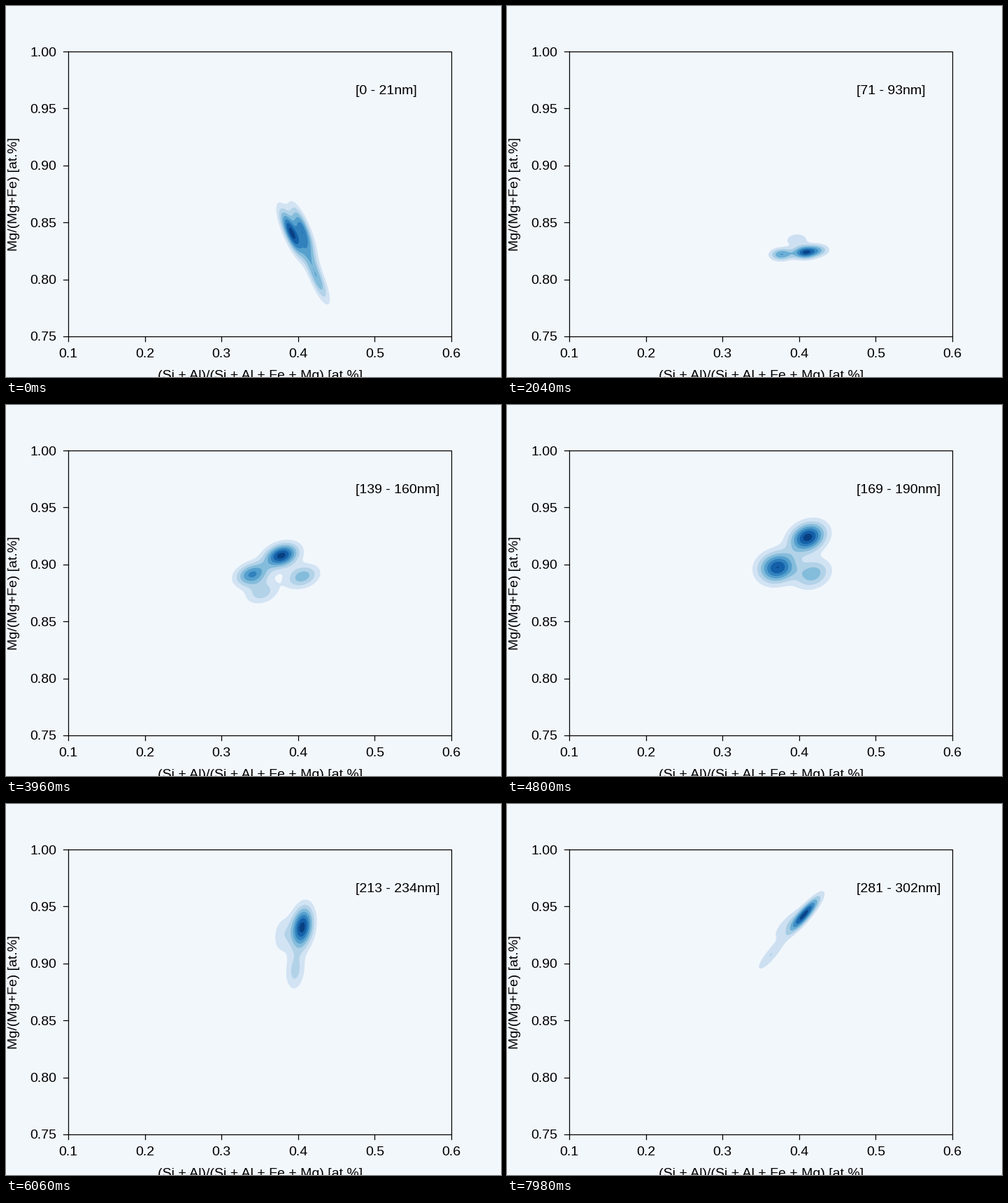
Write a matplotlib script that moves like this. It is 708 px wide and 530 px high and loops after 8000 ms.

```python
import numpy as np
import matplotlib.pyplot as plt
from matplotlib.animation import FuncAnimation

W, H, DPI = 708, 530, 100
INTERVAL, STEP_MS, LOOP = 20, 60, 8000
LEFT, RIGHT, TOP, BOTTOM = 89, 637, 65, 472
DEPTH, WINDOW = 2.1154, 10      # nm per step, steps per depth window
FADE = 0.7                      # weight of each peak relative to the one before
SOFT = 18                       # smallest kernel variance, px^2
WANDER = 9                      # px, free motion between key clouds
BG = "#f2f7fc"

plt.rcParams["font.family"] = "Liberation Sans"
plt.rcParams["font.size"] = 14

# Key clouds: step, colour bands, kernel spread, peaks from strong to weak
CLOUDS = [
    (0, 8, 0.40, [(408, 324), (424, 318), (446, 392), (431, 350)]),
    (20, 7, 0.27, [(430, 331), (398, 291), (468, 418), (463, 364)]),
    (49, 7, 0.17, [(405, 368), (379, 416), (437, 291), (363, 287)]),
    (66, 8, 0.23, [(394, 215), (352, 242), (424, 245), (366, 268)]),
    (92, 8, 0.40, [(450, 180), (408, 213), (460, 246), (398, 200)]),
    (112, 8, 0.42, [(387, 177), (453, 142), (355, 208), (370, 188)]),
    (133, 7, 0.31, [(421, 163), (431, 151), (377, 216), (397, 172)]),
]
key_steps, key_bands, key_spread, key_peaks = map(np.array, zip(*CLOUDS))
weights = FADE ** np.arange(4)
gx, gy = np.meshgrid(np.arange(240, 561, 2.0), np.arange(66, 473, 2.0))


def cloud(step):
    """Peaks, kernel spread and density height in contour steps."""
    i = min(np.searchsorted(key_steps, step, side="right"), len(CLOUDS) - 1) - 1
    u = (step - key_steps[i]) / (key_steps[i + 1] - key_steps[i])
    ease = u * u * (3 - 2 * u)

    def mix(keys):
        return keys[i] + (keys[i + 1] - keys[i]) * ease

    phase = 0.4 * step + 1.7 * np.arange(4)
    drift = np.column_stack([np.sin(phase), np.cos(1.3 * phase)])
    peaks = mix(key_peaks) + WANDER * np.sin(np.pi * u) * drift
    return peaks, mix(key_spread), mix(key_bands) - 0.5


def density(peaks, spread):
    p = np.linalg.inv(np.cov(peaks.T) * spread + SOFT * np.eye(2))
    z = np.zeros_like(gx)
    for (x, y), w in zip(peaks, weights):
        dx, dy = gx - x, gy - y
        z += w * np.exp(-0.5 * (p[0, 0] * dx * dx + 2 * p[0, 1] * dx * dy
                                + p[1, 1] * dy * dy))
    return z / z.max()


fig = plt.figure(figsize=(W / DPI, H / DPI), dpi=DPI, facecolor=BG)
ax = fig.add_axes([0, 0, 1, 1])
ax.set_xlim(0, W)
ax.set_ylim(H, 0)
ax.axis("off")


def line(xs, ys):
    ax.plot(xs, ys, color="black", lw=0.9, zorder=5)


def label(x, y, text, **kw):
    return ax.text(x, y, text, va="baseline", zorder=6, **kw)


line([LEFT, RIGHT, RIGHT, LEFT, LEFT], [TOP, TOP, BOTTOM, BOTTOM, TOP])
for k in range(6):
    x = LEFT + (RIGHT - LEFT) * k / 5
    y = BOTTOM + (TOP - BOTTOM) * k / 5
    line([x, x], [BOTTOM, BOTTOM + 7])
    line([LEFT - 7, LEFT], [y, y])
    label(x, 501.5, f"{0.1 + 0.1 * k:.1f}", ha="center")
    label(72, y + 6.5, f"{0.75 + 0.05 * k:.2f}", ha="right")
label(363.5, 533, "(Si + Al)/(Si + Al + Fe + Mg) [at.%]", ha="center")
label(16, 268.5, "Mg/(Mg+Fe) [at.%]", ha="center", rotation=90,
      rotation_mode="anchor")
depth_text = label(499.6, 125.5, "")

blues = plt.get_cmap("Blues")
layers = []
shown = None


def clear():
    global shown
    while layers:
        layers.pop().remove()
    shown = None


def draw_cloud(step):
    peaks, spread, height = cloud(step)
    z = density(peaks, spread) * height
    bands = int(np.ceil(height))
    for k in range(1, bands):
        layers.append(ax.contourf(gx, gy, z, levels=[k, 99],
                                  colors=[blues((k + 0.5) / bands)],
                                  antialiased=True, zorder=1 + 0.1 * k))


def update(frame):
    global shown
    step = frame * INTERVAL // STEP_MS
    if step != shown:
        clear()
        draw_cloud(step)
        lo, hi = int(step * DEPTH), int((step + WINDOW) * DEPTH)
        depth_text.set_text(f"[{lo} - {hi}nm]")
        shown = step
    return layers + [depth_text]


def init():
    clear()
    return update(0)


anim = FuncAnimation(fig, update, frames=LOOP // INTERVAL, init_func=init,
                     interval=INTERVAL, repeat=True, repeat_delay=0,
                     blit=False)
plt.show()
```
